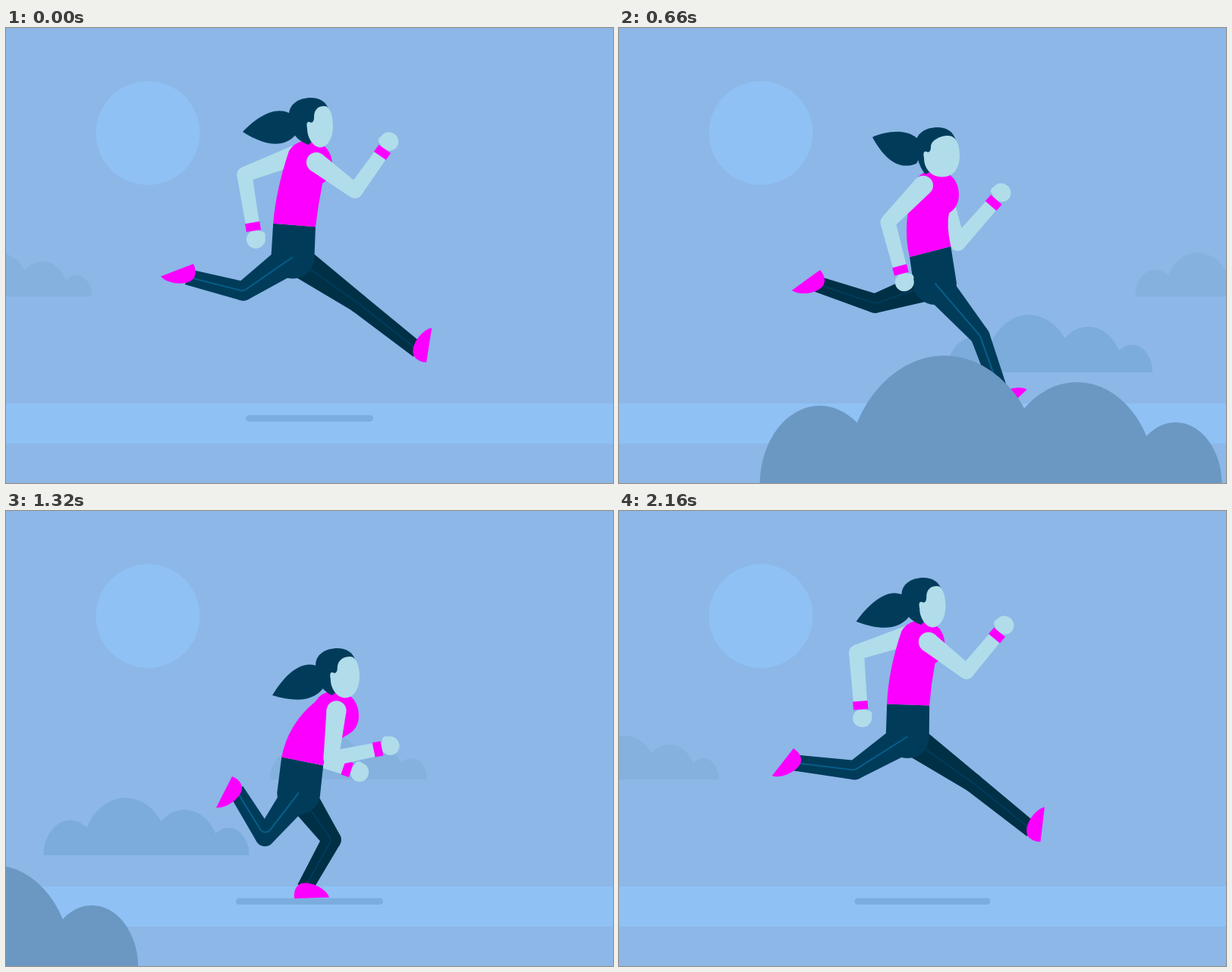
These frames come from a looping animation (800 by 600 pixels, 2.18 s). An HTML page with a canvas:

```html
<!DOCTYPE html>
<html lang="en">
<head>
<meta charset="utf-8">
<title>Runner</title>
<style>
  html, body { margin: 0; width: 100%; height: 100%; overflow: hidden; background: #8cb7e7; }
  canvas { display: block; width: 100vw; height: 100vh; }
</style>
</head>
<body>
<canvas id="stage" width="800" height="600"></canvas>
<script>
const ctx = document.getElementById('stage').getContext('2d');
const LOOP = 2180, STRIDE = 1098, HALF = STRIDE / 2, STEP = 20;
const INK = '#003c5a', SHADE = '#003046', SKIN = '#b1dcea', PINK = '#fb00ff';
const SKY = '#8cb7e7', LIGHT = '#8fc1f5';

// One step: time, head x y, hem offset x y, ponytail tip x y, shadow width.
const bounce = [
  [0,   373, 92,  13, 168, -61, 45, 168],
  [111, 391, 131, 14, 164, -57, 13, 150],
  [222, 408, 181, -15, 149, -57, 62, 194],
  [440, 378, 93,  4, 162, -38, 87, 206],
  [502, 373, 88,  14, 167, -58, 62, 183]
];

// One stride of a foot, from full reach: time, heel x y, foot angle.
const footPath = [
  [0,    554, 441, -81],
  [111,  504, 508, -43],
  [222,  380, 511, -2],
  [440,  233, 378, 86],
  [513,  230, 313, 128],
  [549,  247, 311, 159],
  [660,  265, 319, 144],
  [771,  298, 350, 117],
  [989,  437, 405, 35],
  [1051, 547, 434, -75]
];

// One stride of a wrist, from furthest forward: time, x y from the head.
const wristPath = [
  [0,    123, 72],
  [222,  82, 133],
  [440,  -62, 175],
  [530,  -60, 168],
  [660,  -20, 188],
  [771,  43, 159],
  [1010, 120, 94]
];

// Smooth periodic curve through keys of the form [time, ...values].
function spline(keys, period, time) {
  const n = keys.length, t = time % period;
  const at = i => {
    const lap = Math.floor(i / n), [start, ...v] = keys[i - lap * n];
    return { t: start + lap * period, v };
  };
  let i = n - 1;
  while (keys[i][0] > t) i--;
  const [a, b, c, d] = [i - 1, i, i + 1, i + 2].map(at);
  const span = c.t - b.t, s = (t - b.t) / span, s2 = s * s, s3 = s2 * s;
  return b.v.map((p, j) => {
    const q = c.v[j];
    const m = (q - a.v[j]) / (c.t - a.t) * span;
    const k = (d.v[j] - p) / (d.t - b.t) * span;
    return (2 * s3 - 3 * s2 + 1) * p + (s3 - 2 * s2 + s) * m + (3 * s2 - 2 * s3) * q + (s3 - s2) * k;
  });
}

const rad = deg => deg * Math.PI / 180;

function offset([x, y], angle, dx, dy) {
  const c = Math.cos(angle), s = Math.sin(angle);
  return [x + dx * c - dy * s, y + dx * s + dy * c];
}

// Middle joint: the closer the ends, the further it sticks out to one side.
function bend(a, b, slack, side) {
  const dx = b[0] - a[0], dy = b[1] - a[1], dist = Math.hypot(dx, dy);
  const out = side * Math.max(0, slack - 0.46 * dist);
  return offset(a, Math.atan2(dy, dx), dist * 0.51, out);
}

function fill(color, draw) {
  ctx.fillStyle = color;
  ctx.beginPath();
  draw();
  ctx.fill();
}

const disc = (color, [x, y], r) => fill(color, () => ctx.arc(x, y, r, 0, 7));

function local([x, y], angle, draw) {
  ctx.save();
  ctx.translate(x, y);
  ctx.rotate(angle);
  draw();
  ctx.restore();
}

function taper(color, a, b, ra, rb) {
  const len = Math.hypot(b[0] - a[0], b[1] - a[1]);
  local(a, Math.atan2(b[1] - a[1], b[0] - a[0]), () => fill(color, () => {
    ctx.moveTo(0, -ra);
    ctx.lineTo(len, -rb);
    ctx.lineTo(len, rb);
    ctx.lineTo(0, ra);
  }));
}

function limb(color, a, b, c, ra, rb, rc) {
  taper(color, a, b, ra, rb);
  disc(color, b, rb);
  taper(color, b, c, rb, rc);
}

function leg(hip, time, color, stripe) {
  const [x, y, deg] = spline(footPath, STRIDE, time);
  const angle = rad(deg), heel = [x, y];
  const ankle = offset(heel, angle, 14, -13), knee = bend(hip, ankle, 97.5, -1);
  limb(color, hip, knee, ankle, 21, 12.7, 10.5);
  ctx.strokeStyle = stripe;
  ctx.lineWidth = 2;
  ctx.beginPath();
  ctx.moveTo(...hip);
  ctx.arcTo(...knee, ...ankle, 8);
  ctx.lineTo(...ankle);
  ctx.stroke();
  local(heel, angle, () => fill(PINK, () => {
    ctx.moveTo(0, 0);
    ctx.bezierCurveTo(-1, -11, 4, -20, 14, -20);
    ctx.bezierCurveTo(27, -20, 43, -10, 46, 0);
  }));
}

function arm(x, y, turn, time, slack, swing) {
  const shoulder = [x + 22 + 14 * turn, y + 80.5 + 4.5 * turn];
  const [wx, wy] = spline(wristPath, STRIDE, time);
  const wrist = [x + 30 + swing * (wx - 30), y + wy];
  const elbow = bend(shoulder, wrist, slack, 1);
  disc(SKIN, shoulder, 13);
  limb(SKIN, shoulder, elbow, wrist, 13, 10, 9);
  local(wrist, Math.atan2(wrist[1] - elbow[1], wrist[0] - elbow[0]), () => {
    fill(SKIN, () => ctx.ellipse(17, -1, 12, 12.5, 0, 0, 7));
    disc(SKIN, [13, -9], 5.5);
    ctx.fillStyle = PINK;
    ctx.fillRect(-5.5, -9.7, 11, 19.4);
  });
}

function ponytail(x, y, tx, ty) {
  const dx = tx - 6, dy = ty - 30, len = Math.hypot(dx, dy);
  local([x + 6, y + 30], Math.atan2(dy, dx), () => fill(INK, () => {
    ctx.moveTo(-3, 2);
    ctx.bezierCurveTo(10, 28, 46, 16, len, 0);
    ctx.bezierCurveTo(len * 0.65, -24, len * 0.3, -34, 0, -18);
  }));
}

function torso(x, y, hem, tilt, hip) {
  const left = offset(hem, tilt, -28, 0), right = offset(hem, tilt, 28, 0);
  fill(INK, () => {
    ctx.moveTo(...left);
    ctx.lineTo(...right);
    ctx.arc(...hip, 28.5, 0, Math.PI);
  });
  fill(PINK, () => {
    ctx.moveTo(...left);
    ctx.quadraticCurveTo(...offset(left, tilt, 0, -45), x, y + 70);
    ctx.quadraticCurveTo(x + 6, y + 60, x + 18, y + 57);
    ctx.lineTo(x + 40, y + 60);
    ctx.bezierCurveTo(x + 51, y + 64, x + 57, y + 76, x + 57, y + 89);
    ctx.bezierCurveTo(x + 57, y + 101, x + 51, y + 109, x + 44, y + 113);
    ctx.quadraticCurveTo(...offset(right, tilt, 1, -28), ...right);
  });
}

function head(x, y, turn) {
  const w = 41 - 7 * turn, l = 58 - w, top = 58 - w * 0.33;
  local([x, y], 0, () => {
    fill(INK, () => {
      ctx.moveTo(53, 18);
      ctx.bezierCurveTo(50, 5, 40, 0, 29, 0);
      ctx.bezierCurveTo(12, 0, 0, 9, 0, 22);
      ctx.bezierCurveTo(0, 40, 7, 56, l + 2, 62);
      ctx.lineTo(42, 45);
    });
    fill(SKIN, () => {
      ctx.moveTo(l, 40);
      ctx.bezierCurveTo(l - 1, 36, l - 1, 31, l + 3, 32);
      ctx.bezierCurveTo(l + 7, 34, l + 9, 31, l + 9, 26);
      ctx.bezierCurveTo(l + 9, 17, top - 10, 11, top, 11);
      ctx.bezierCurveTo(54, 11, 58, 24, 58, 37);
      ctx.bezierCurveTo(58, 54, 50, 65.5, 58 - w / 2, 65.5);
      ctx.bezierCurveTo(l + 8, 65, l, 53, l, 40);
    });
  });
}

function runner(t, x, y, lean, drop, tx, ty) {
  const phase = 2 * Math.PI * t / STRIDE;
  const turn = Math.cos(phase - 0.1);
  const tilt = rad(13.5 * Math.cos(phase - 1.05) - 2);
  const hem = [x + lean - 6 * turn, y + drop];
  const hip = offset(hem, tilt * 0.6, 0, 42);
  arm(x, y, -turn, t + HALF, 95, 0.9);
  leg(hip, t, SHADE, '#003c5c');
  ponytail(x, y, tx, ty);
  torso(x, y, hem, tilt, hip);
  leg(hip, t + HALF, INK, '#075f8a');
  head(x, y, turn);
  arm(x, y, turn, t, 85.5, 1);
}

// Each bump: centre, half width, height.
const bumps = [[79, 79, 104], [243, 131, 170], [418, 104, 135], [548, 61, 82]];

function cloud(color, x, base, scale) {
  for (const [cx, rx, h] of bumps) {
    fill(color, () => ctx.ellipse(x + cx * scale, base, rx * scale, h * scale, 0, Math.PI, 2 * Math.PI));
  }
}

function draw(t) {
  const [x, y, lean, drop, tx, ty, shadow] = spline(bounce, HALF, t);
  ctx.fillStyle = SKY;
  ctx.fillRect(0, 0, 800, 600);
  disc(LIGHT, [187, 138.5], 68.5);
  ctx.fillStyle = LIGHT;
  ctx.fillRect(0, 495, 800, 53);
  fill('#7badde', () => ctx.roundRect(400 - shadow / 2, 510.5, shadow, 8.5, 4.25));
  // The far cloud is still leaving when the loop restarts.
  cloud('#84b1de', 1013 - 0.504 * (t < 300 ? t + 2 * STRIDE : t), 354, 0.34);
  cloud('#7cacdc', 815 - 0.58 * t, 454, 0.445);
  runner(t, x, y, lean, drop, tx, ty);
  cloud('#6b98c3', 806 - 0.94 * t, 602, 1);
}

const start = performance.now();
function tick() {
  const t = (performance.now() - start) % LOOP;
  draw(Math.floor(t / STEP) * STEP);
  requestAnimationFrame(tick);
}
tick();
</script>
</body>
</html>
```
